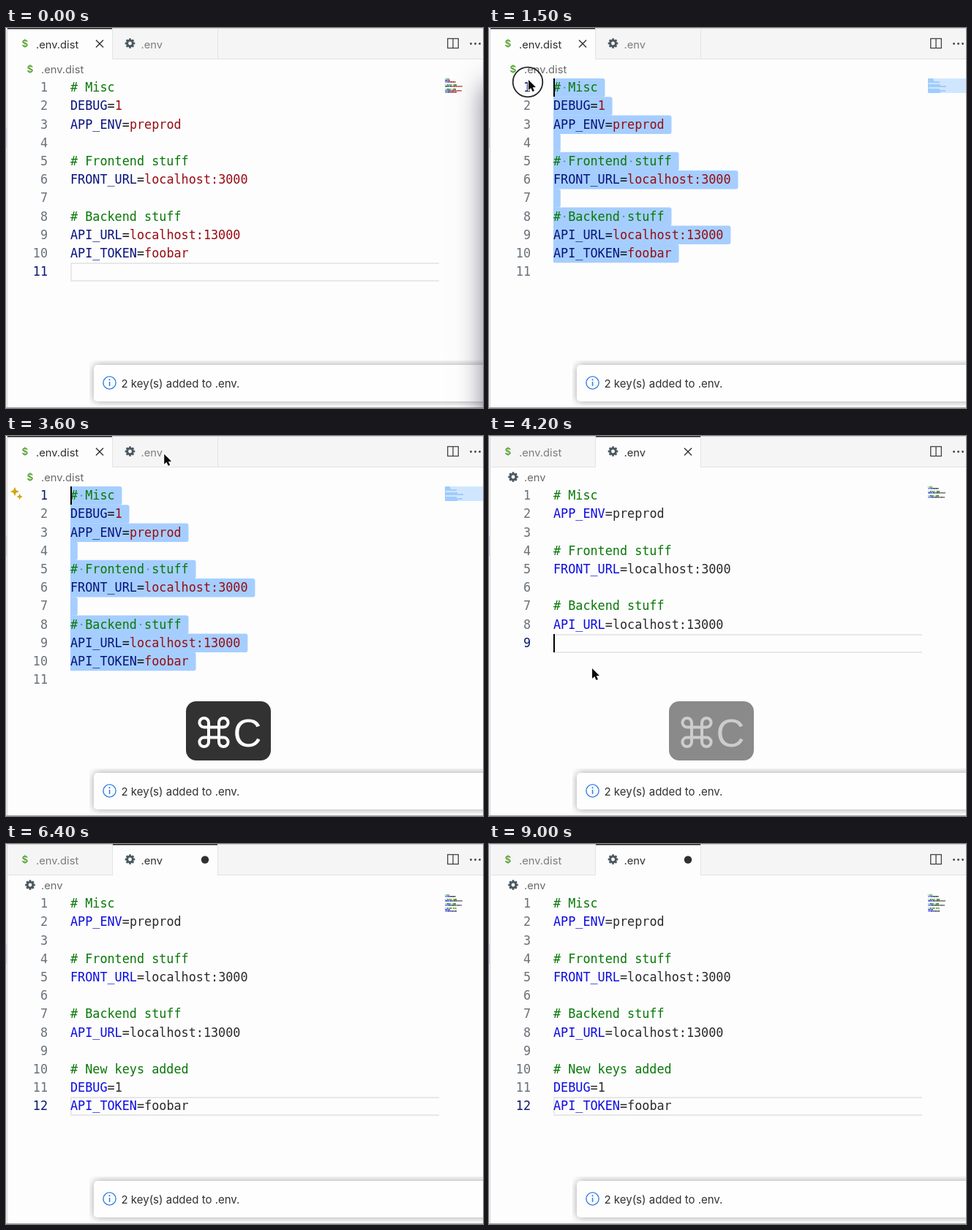
Write an HTML page with a canvas that moves like this. It is 652 px wide and 520 px high and loops after 9100 ms.

```html
<!DOCTYPE html>
<html lang="en">
<head>
<meta charset="utf-8">
<title>Env sync</title>
<style>
html, body { margin: 0; width: 100%; height: 100%; overflow: hidden; background: #fdfdfd; }
canvas { display: block; }
</style>
</head>
<body>
<canvas id="stage" width="652" height="520"></canvas>
<script>
const ctx = document.getElementById('stage').getContext('2d');
const LOOP = 9100, STEP = 100;
const UI = 'Inter, "Open Sans", sans-serif';
const MONO = '16.8px "DejaVu Sans Mono", monospace';
const LEFT = 88, TOP = 69, ROW = 25.2, CHAR = 10.11;
const SELECT = '#a5ceff';

const DIST = ['# Misc', 'DEBUG=1', 'APP_ENV=preprod', '', '# Frontend stuff',
  'FRONT_URL=localhost:3000', '', '# Backend stuff', 'API_URL=localhost:13000',
  'API_TOKEN=foobar', ''];
const ENV = ['# Misc', 'APP_ENV=preprod', '', '# Frontend stuff',
  'FRONT_URL=localhost:3000', '', '# Backend stuff', 'API_URL=localhost:13000', ''];
const MERGED = [...ENV, '# New keys added', 'DEBUG=1', 'API_TOKEN=foobar'];

const DIST_INK = { key: '#07127a', eq: '#111', val: '#980d14' };
const ENV_INK = { key: '#0c0ce0', eq: '#222', val: '#2b2b2b' };
const COMMENT = '#087808';

// Moments of the story, in ms
const PRESS = 1000, RELEASE = 1700, SPARK = 1900, COPY = 3000, SWITCH = 3800,
  PASTE = 5200, TOAST = 5300, MOUSE_OUT = 5700;
const BLINK = 960;
const blinkStarts = [-480, 1400, SWITCH, PASTE, 5600];
const mousePath = [
  [100, 658, 430], [900, 54, 334], [1050, 54, 334], [1400, 54, 71], [1700, 54, 71],
  [2500, 392, 139], [3100, 392, 139], [3650, 212, 22], [3800, 212, 22],
  [4200, 141, 318], [4400, 140, 309]
];

const clamp = (v, a, b) => Math.min(b, Math.max(a, v));
const ease = p => p * p * (3 - 2 * p);

function mouseAt(t) {
  const i = mousePath.findIndex(k => k[0] > t);
  if (i < 0) return mousePath[mousePath.length - 1].slice(1);
  if (i === 0) return mousePath[0].slice(1);
  const [t0, x0, y0] = mousePath[i - 1], [t1, x1, y1] = mousePath[i];
  const p = ease((t - t0) / (t1 - t0));
  return [x0 + (x1 - x0) * p, y0 + (y1 - y0) * p];
}

function box(x, y, w, h, color) {
  ctx.fillStyle = color;
  ctx.fillRect(x, y, w, h);
}

function round(x, y, w, h, r, color) {
  ctx.fillStyle = color;
  ctx.beginPath();
  ctx.roundRect(x, y, w, h, r);
  ctx.fill();
}

function label(s, x, y, color, font = '14.7px ' + UI, align = 'left') {
  ctx.font = font;
  ctx.fillStyle = color;
  ctx.textAlign = align;
  ctx.fillText(s, x, y);
}

function stroke(color, width, pts, close) {
  ctx.strokeStyle = color;
  ctx.lineWidth = width;
  ctx.beginPath();
  pts.forEach(p => ctx.lineTo(...p));
  if (close) ctx.closePath();
  ctx.stroke();
}

function disc(x, y, r, color) {
  ctx.fillStyle = color;
  ctx.beginPath();
  ctx.arc(x, y, r, 0, 7);
  ctx.fill();
}

function ring(x, y, r, width, color) {
  ctx.strokeStyle = color;
  ctx.lineWidth = width;
  ctx.beginPath();
  ctx.arc(x, y, r, 0, 7);
  ctx.stroke();
}

function gear(x, y, color) {
  ring(x, y, 3.9, 3, color);
  for (let i = 0; i < 8; i++) {
    const c = Math.cos(i * Math.PI / 4), s = Math.sin(i * Math.PI / 4);
    stroke(color, 2.7, [[x + c * 4.6, y + s * 4.6], [x + c * 6.8, y + s * 6.8]]);
  }
}

function dollar(x, y) {
  label('$', x, y, '#55a02f', '600 13.5px ' + UI, 'center');
}

function closeMark(x, y) {
  stroke('#333', 1.4, [[x - 5, y - 5], [x + 5, y + 5]]);
  stroke('#333', 1.4, [[x + 5, y - 5], [x - 5, y + 5]]);
}

function drawChrome(onEnv, dirty) {
  box(0, 0, 652, 520, '#fdfdfd');
  box(0, 0, 652, 42, '#f5f5f5');
  box(0, 42, 652, 1, '#e3e3e3');
  const x = onEnv ? 146 : 2, w = onEnv ? 143 : 143;
  box(x, 0, w, 43, '#fdfdfd');
  box(0, 0, 652, 1, '#d2d2d2');
  box(x, 0, w, 1.5, '#222');
  box(145, 1, 1, 42, '#e3e3e3');
  box(289, 1, 1, 42, '#e3e3e3');

  dollar(26, 26);
  label('.env.dist', 41, 27.5, onEnv ? '#7d7d7d' : '#2f2f2f');
  gear(169.5, 21, '#4b5962');
  label('.env', 184.5, 27.5, onEnv ? '#2f2f2f' : '#7d7d7d');
  if (!onEnv) closeMark(128, 21.5);
  else if (dirty) disc(272, 21.5, 5.2, '#303030');
  else closeMark(272, 21.5);

  ctx.strokeStyle = '#444';
  ctx.lineWidth = 1.3;
  ctx.strokeRect(603.7, 14.5, 14.6, 13);
  stroke('#444', 1.3, [[611, 14.5], [611, 27.5]]);
  [635.5, 641.5, 647.5].forEach(d => disc(d, 21.5, 1.4, '#444'));

  if (onEnv) gear(33, 56, '#4b5962');
  else dollar(33, 61);
  label(onEnv ? '.env' : '.env.dist', 48, 62, '#6a6a6a');
}

function drawCode(lines, ink, active, selFrom) {
  const rowY = i => TOP + i * ROW;
  const selected = selFrom >= 0;
  if (!selected) {
    const y = Math.round(rowY(active));
    box(LEFT, y, 504, 2, '#e8e8e8');
    box(LEFT, y + 24, 504, 2, '#e8e8e8');
    box(LEFT, y, 2, 26, '#e8e8e8');
  }
  lines.forEach((s, i) => {
    const y = rowY(i), base = y + 18.2;
    const inSel = selected && i >= selFrom && i < lines.length - 1;
    if (inSel) round(LEFT, y, (s.length + 1) * CHAR - 0.3, ROW + 0.3, [0, 3, 3, 0], SELECT);
    label(i + 1, 57, base, i === active ? '#0b1a70' : '#69727a', MONO, 'right');
    if (s[0] === '#') {
      label(s, LEFT, base, COMMENT, MONO);
      if (inSel) [...s].forEach((c, n) => {
        if (c === ' ') disc(LEFT + (n + 0.5) * CHAR, y + 12.6, 1.2, '#5f93b0');
      });
    } else if (s) {
      const n = s.indexOf('=');
      label(s.slice(0, n), LEFT, base, ink.key, MONO);
      label('=', LEFT + n * CHAR, base, ink.eq, MONO);
      label(s.slice(n + 1), LEFT + (n + 1) * CHAR, base, ink.val, MONO);
    }
  });
}

function drawMinimap(lines, ink, selFrom) {
  if (selFrom >= 0) {
    const end = lines.length - 1;
    box(600, TOP + selFrom * 2, 52, (end - selFrom) * 2, '#d0e6ff');
    for (let i = selFrom; i < end; i++)
      box(600, TOP + i * 2, lines[i].length + 1, 2, '#9fccfb');
    if (selFrom === 0) return;
  }
  lines.forEach((s, i) => {
    if (selFrom >= 0 && i >= selFrom) return;
    const eq = s.indexOf('=');
    [...s].forEach((c, n) => {
      if (c === ' ') return;
      ctx.globalAlpha = 0.5 + (c.charCodeAt(0) * 7 % 5) * 0.1;
      box(600 + n, TOP + i * 2, 1, 1.6, s[0] === '#' ? COMMENT : n < eq ? ink.key : ink.val);
    });
    ctx.globalAlpha = 1;
  });
}

function star(x, y, r) {
  ctx.fillStyle = '#cfa50c';
  ctx.beginPath();
  for (let i = 0; i < 8; i++) {
    const a = i * Math.PI / 4, d = i % 2 ? r * 0.42 : r;
    ctx.lineTo(x + Math.cos(a) * d, y + Math.sin(a) * d);
  }
  ctx.fill();
}

function drawToast(shift, alpha) {
  ctx.save();
  ctx.beginPath();
  ctx.rect(114, 455, 538, 62);
  ctx.clip();
  ctx.globalAlpha = alpha;
  ctx.translate(0, shift);
  ctx.shadowColor = 'rgba(0,0,0,.36)';
  ctx.shadowBlur = 11;
  round(120, 461, 560, 50, 5, '#fefefe');
  ctx.shadowColor = 'transparent';
  ring(141.5, 485.5, 8.6, 1.4, '#2f7de6');
  box(140.8, 484, 1.5, 6, '#2f7de6');
  disc(141.5, 481.3, 1.1, '#2f7de6');
  label('2 key(s) added to .env.', 157.5, 491.5, '#303030', '15px ' + UI);
  ctx.restore();
}

function command(cx, cy) {
  const a = 7, c = 13.3, r = c - a;
  ctx.save();
  ctx.translate(cx, cy);
  ctx.beginPath();
  for (let i = 0; i < 4; i++) {
    ctx.moveTo(a, c);
    ctx.lineTo(a, -c);
    ctx.arc(c, -c, r, Math.PI, Math.PI * 2.5);
    ctx.rotate(Math.PI / 2);
  }
  ctx.stroke();
  ctx.restore();
}

function drawKeys(withShift, k) {
  if (k <= 0) return;
  ctx.globalAlpha = k * 0.8;
  round(246, 363, withShift ? 171 : 116, 81, 14, '#000');
  ctx.globalAlpha = k;
  ctx.lineJoin = 'round';
  if (withShift) {
    stroke('#fff', 4, [[285.5, 386], [307.5, 408], [296.5, 408], [296.5, 425],
      [274.5, 425], [274.5, 408], [263.5, 408]], true);
  }
  ctx.strokeStyle = '#fff';
  ctx.lineWidth = 4;
  command(withShift ? 341 : 284, 405.5);
  label(withShift ? 'V' : 'C', withShift ? 386.5 : 330, 425, '#fff',
    '54px "Liberation Sans", Arial, sans-serif', 'center');
  ctx.globalAlpha = 1;
  ctx.lineJoin = 'miter';
}

function drawArrow(x, y) {
  const pts = [[0, 0], [0, 14], [3.2, 11], [5.6, 16], [8, 15], [5.7, 10.2], [10, 10]];
  ctx.save();
  ctx.translate(x, y);
  ctx.lineJoin = 'round';
  stroke('#fff', 2.4, pts, true);
  ctx.fillStyle = '#0a0a0a';
  ctx.fill();
  ctx.restore();
}

function drawBeam(x, y) {
  for (const [color, w] of [['#fff', 3], ['#111', 1.3]]) {
    stroke(color, w, [[x, y - 6], [x, y + 6]]);
    for (const s of [-1, 1])
      stroke(color, w, [[x - 3, y + s * 7.5], [x, y + s * 6], [x + 3, y + s * 7.5]]);
  }
}

function drawSideShadow(alpha) {
  if (alpha <= 0) return;
  ctx.save();
  ctx.shadowColor = `rgba(35,35,65,${0.6 * alpha})`;
  ctx.shadowBlur = 34;
  ctx.fillStyle = '#000';
  ctx.fillRect(653, 78, 200, 600);
  ctx.restore();
}

function draw(t) {
  const onEnv = t >= SWITCH, pasted = t >= PASTE;
  const lines = pasted ? MERGED : onEnv ? ENV : DIST;
  const ink = onEnv ? ENV_INK : DIST_INK;
  const last = lines.length - 1;
  const [mx, my] = mouseAt(t);

  let active = last;
  if (!onEnv && t >= PRESS)
    active = t < RELEASE ? clamp(Math.floor((my - TOP) / ROW), 0, last) : 0;
  const selFrom = active < last ? active : -1;

  drawChrome(onEnv, pasted);
  drawCode(lines, ink, active, selFrom);
  drawMinimap(lines, ink, selFrom);

  const since = t - blinkStarts.filter(s => s <= t).pop();
  if (since % BLINK < BLINK / 2) {
    const col = selFrom < 0 ? lines[active].length : 0;
    box(LEFT + Math.round(col * CHAR), Math.round(TOP + active * ROW), 2, 25, '#000');
  }
  if (t >= SPARK && !onEnv) {
    star(12, 76, 6.2);
    star(18.7, 83, 4.2);
  }

  // The notice is replaced by a fresh one after the paste
  if (t < PASTE) drawToast(0, 1);
  else if (t >= TOAST) {
    const p = clamp((t - TOAST) / 260, 0, 1);
    drawToast(50 * (1 - p), p);
  }

  box(0, 518, 652, 1, '#f0f0f0');
  box(0, 519, 652, 1, '#a9a9a9');
  box(0, 0, 1, 519, '#f4f4f4');
  box(1, 0, 1, 519, '#d3d3d3');
  box(0, 137, 1, 27, '#d9d9f0');

  if (t >= COPY && t < 4800) drawKeys(false, clamp(1 - (t - 4000) / 465, 0, 1));
  if (t >= PASTE - 100) drawKeys(true, clamp(1 - (t - 5900) / 465, 0, 1));

  if (t >= 100 && t < MOUSE_OUT) {
    const down = (t >= PRESS && t < RELEASE) || (t >= 3700 && t < 3900);
    if (down) ring(mx - 1, my + 3, 20.3, 1.8, '#26262b');
    if (t < 4300) drawArrow(mx, my);
    else drawBeam(mx, my);
  }
  drawSideShadow(1 - t / 300);
}

const start = performance.now();
function tick() {
  const t = (performance.now() - start) % LOOP;
  draw(Math.floor(t / STEP) * STEP);
  requestAnimationFrame(tick);
}
tick();
</script>
</body>
</html>
```
